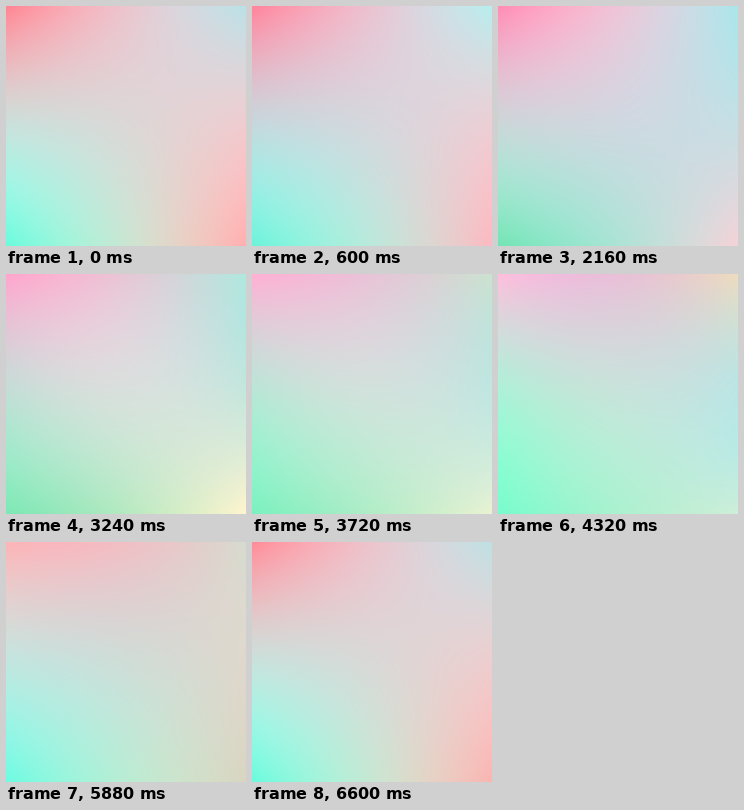
Recreate the animation shown at these times as an HTML page with a canvas. Size 300 px wide and 300 px high, loop 6720 ms.

```html
<!DOCTYPE html>
<html lang="en">
<head>
<meta charset="utf-8">
<title>Drifting gradient</title>
<style>
html, body { margin: 0; width: 100%; height: 100%; overflow: hidden; }
canvas { display: block; width: 100vw; height: 100vh; }
</style>
</head>
<body>
<canvas width="300" height="300"></canvas>
<script>
const LOOP = 6720, STEP = 120, SIZE = 300;
const ctx = document.querySelector('canvas').getContext('2d');
const image = ctx.createImageData(SIZE, SIZE);

// Each key: start time and a 3 x 3 mesh of colours, row by row
const keys = [
  [0,    'ff8592 e4cdd5 b9e1e6 d7d4d2 e0d4d6 e8d0d4 69fadc d7decd ffafaf'],
  [1200, 'ff82a5 e1cddc b4faf5 cdc5d9 d7d4e1 e1d7de 6eebd7 b9e6e1 f8c3d2'],
  [2160, 'ff8cb4 e4cddc aae6eb d7cdd7 d2d7e1 bee1e6 73e4b4 b9e1d7 f5d2d7'],
  [3240, 'ffa5cd decdd7 afe8de cdd7d7 dadede bee6de 7de8b4 c3ebc3 fff5cd'],
  [4320, 'ffbedc e8c3d4 eedcbe b8ebd9 cddedc bee4e1 78fccd b2f0d0 cdeed7'],
  [5280, 'fad7d2 f3bcbc ebd7be cae6e0 d0dad2 d7dec8 6efce6 b4f0d2 bcf0cd']
].map(([time, mesh]) => ({
  time,
  mesh: mesh.match(/\w\w/g).map(v => parseInt(v, 16))
}));
keys.push({ time: LOOP, mesh: keys[0].mesh });

// Quadratic weights for mesh lines at 0, mid and 1
function weights(mid) {
  return Array.from({ length: SIZE }, (_, i) => {
    const p = i / (SIZE - 1);
    return [
      (p - mid) * (p - 1) / mid,
      p * (p - 1) / (mid * (mid - 1)),
      p * (p - mid) / (1 - mid)
    ];
  });
}
const across = weights(0.6), down = weights(0.4);

function meshAt(t) {
  const i = keys.findIndex(k => k.time > t);
  const a = keys[i - 1], b = keys[i];
  const u = (t - a.time) / (b.time - a.time);
  return a.mesh.map((v, j) => v + (b.mesh[j] - v) * u);
}

function draw(t) {
  const mesh = meshAt(t), data = image.data;
  let n = 0;
  for (const [d0, d1, d2] of down) {
    const row = [];
    for (let j = 0; j < 9; j++) {
      row[j] = mesh[j] * d0 + mesh[j + 9] * d1 + mesh[j + 18] * d2;
    }
    for (const [a0, a1, a2] of across) {
      for (let c = 0; c < 3; c++) {
        data[n++] = row[c] * a0 + row[c + 3] * a1 + row[c + 6] * a2;
      }
      data[n++] = 255;
    }
  }
  ctx.putImageData(image, 0, 0);
}

let shown = -1;
function tick() {
  const t = Math.floor(performance.now() % LOOP / STEP) * STEP;
  if (t !== shown) draw(shown = t);
  requestAnimationFrame(tick);
}
tick();
</script>
</body>
</html>
```
